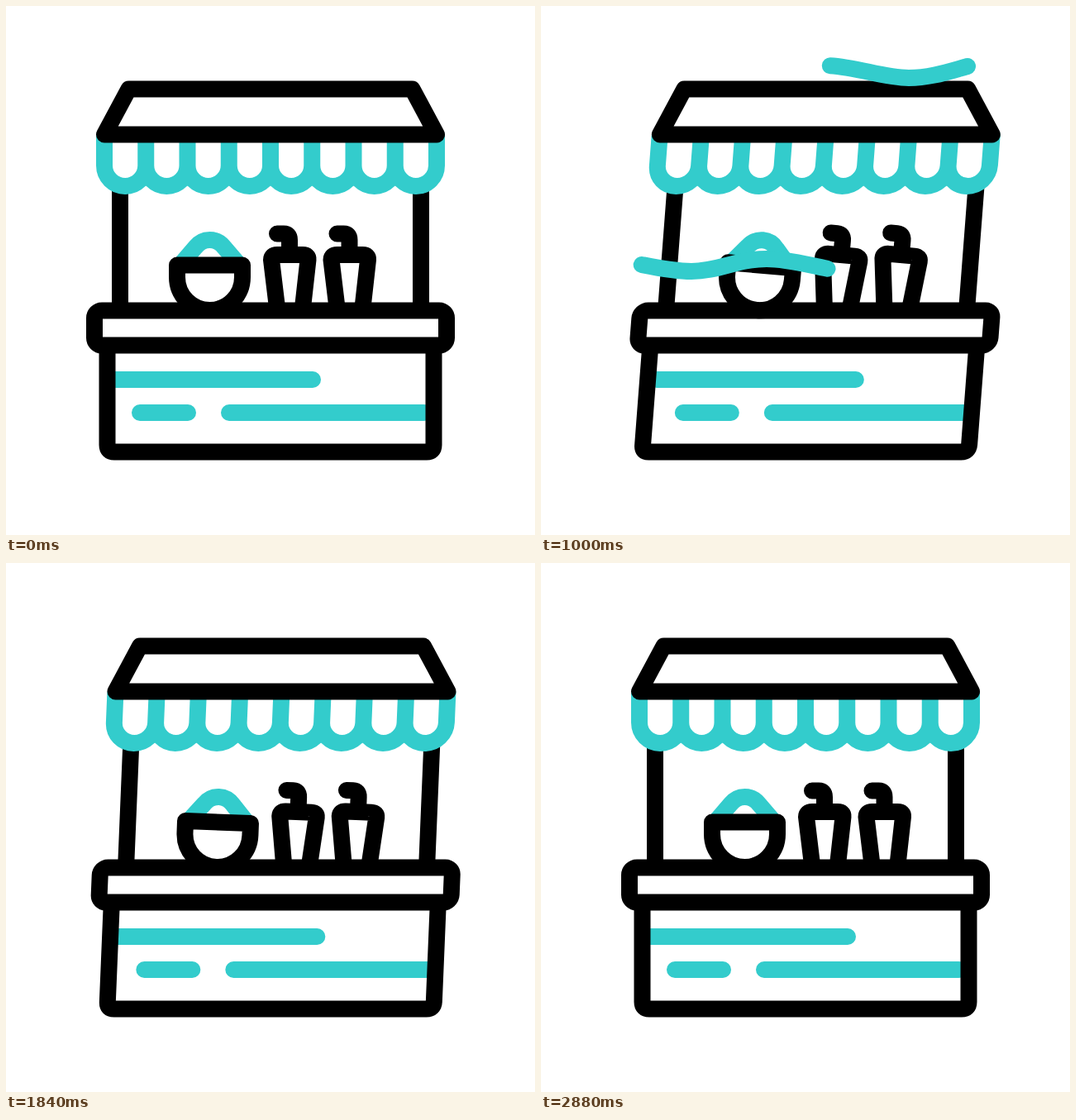
An HTML page that plays this animation: 640x640 px, repeating every 3000 ms.

```html
<!DOCTYPE html>
<html lang="en">
<head>
<meta charset="utf-8">
<title>Market stall in the wind</title>
<style>
  html, body { margin: 0; height: 100%; overflow: hidden; background: #fff; }
  svg { display: block; width: 100vw; height: 100vh; }
  g, path, rect { fill: none; stroke: #000; stroke-width: 20; stroke-linecap: round; stroke-linejoin: round; }
  .teal { stroke: #3cc; }
  #awning { fill: #fff; }
</style>
</head>
<body>
<svg viewBox="0 0 640 640">
  <defs>
    <g id="cup">
      <path d="M328 365L321 307Q321 301 328 301H359Q366 301 365.500 307L359 365"/>
      <path d="M328 275.500H336Q343 275.500 343 283V300"/>
    </g>
  </defs>
  <path id="posts" d="M138 190V368M502 190V368"/>
  <path id="awning" class="teal"/>
  <path id="roof" d="M119 155.500L148.500 100.500H491.500L521 155.500Z"/>
  <g id="bowl">
    <path class="teal" d="M211 313L229 292Q236 283 246.500 283Q257 283 264 292L282 313"/>
    <path d="M207 313.500H286V328A39.500 40 0 0 1 207 328Z"/>
  </g>
  <use id="cup1" href="#cup"/>
  <use id="cup2" href="#cup"/>
  <path id="bars" class="teal" d="M130 452H371M162 492H220M270 492H505"/>
  <path id="base" d="M122.500 411V531Q122.500 539.500 131 539.500H509Q517.500 539.500 517.500 531V411"/>
  <rect id="counter" x="107" y="368.500" width="426" height="42" rx="9"/>
  <path id="wind1" class="teal wind"/>
  <path id="wind2" class="teal wind"/>
</svg>
<script>
const LOOP = 3000;
const $ = id => document.getElementById(id);
const place = (id, value) => $(id).setAttribute('transform', value);

const ease = (t, start, duration) => {
  const u = Math.min(1, Math.max(0, (t - start) / duration));
  return u * u * (3 - 2 * u);
};

// Eased value through [time, value] keys
const track = (t, keys) => keys.slice(1).reduce((value, [time, next], i) => {
  const [from, previous] = keys[i];
  return value + (next - previous) * ease(t, from, time - from);
}, keys[0][1]);

const LEAN = [[200, 0], [760, 1], [1080, 0.74], [1400, 1], [2200, 0]];
const TILT = [[200, 0], [760, 7.4], [1400, 0], [1800, 2.3], [2240, -4.1], [2840, 0]];

$('awning').setAttribute('d', Array.from({ length: 8 }, (_, i) =>
  `M${119 + i * 50.25} 157V193a25.125 25 0 0 0 50.25 0V157`).join(''));

for (const wave of document.querySelectorAll('.wind')) {
  wave.setAttribute('d', 'M0 0C33 4 62 14 95 14S150 -1 186 -1S257 14 289 14C315 14 338 6 360 0');
  wave.setAttribute('pathLength', 1);
}

function skew(id, amount, pivotY) {
  place(id, `matrix(1 0 ${-amount} 1 ${amount * pivotY} 0)`);
}

function blow(id, t, start, x, y) {
  const head = ease(t, start, 800), tail = ease(t, start + 360, 840);
  const wave = $(id);
  place(id, `translate(${x} ${y})`);
  wave.style.display = head - tail > 0.001 ? '' : 'none';
  wave.style.strokeDasharray = `${head - tail} 2`;
  wave.style.strokeDashoffset = -tail;
}

function draw(t) {
  const lean = track(t, LEAN), tilt = track(t, TILT);
  const slope = lean * 0.098, slide = lean * 19.5;

  for (const id of ['posts', 'base', 'counter']) skew(id, slope, 539);
  skew('awning', slope, 479.5);
  place('roof', `translate(${lean * 31.8} 0)`);
  place('bars', `translate(${lean * 12.6} 0)`);
  place('bowl', `translate(${slide} 0) rotate(${tilt} 246.5 360)`);
  place('cup1', `translate(${slide} 0) rotate(${tilt} 343 360)`);
  place('cup2', `translate(${slide + 72.5} 0) rotate(${tilt} 343 360)`);

  const drift = Math.max(-20, Math.min(0, (t - 1000) / 16));
  blow('wind1', t, 200, 156 + drift, 73);
  blow('wind2', t, 480, 87, 307);
}

function tick() {
  draw(performance.now() % LOOP);
  requestAnimationFrame(tick);
}
tick();
</script>
</body>
</html>
```
